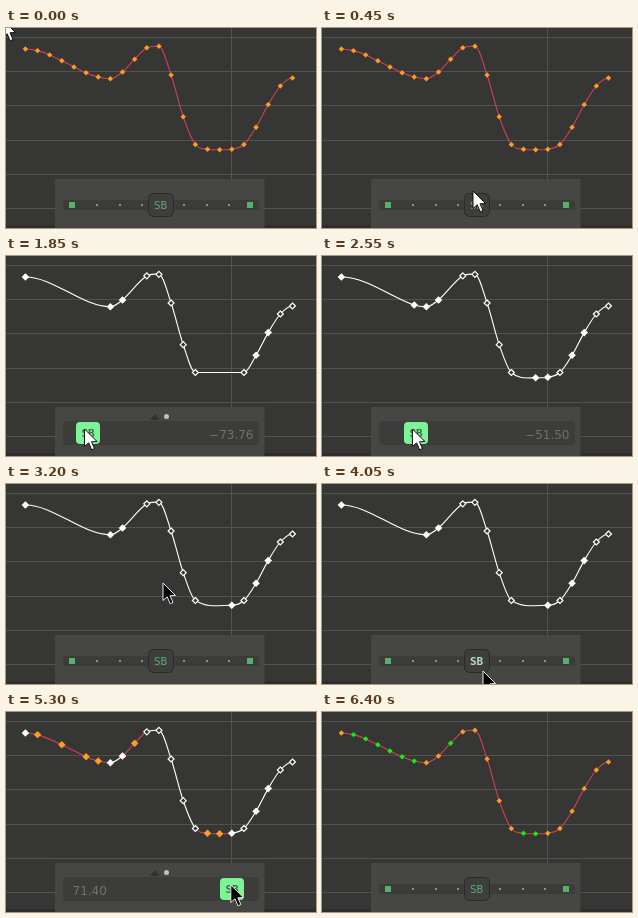
An HTML page with a canvas that plays this animation: 310 px wide and 200 px high, repeating every 6550 ms.

```html
<!DOCTYPE html>
<html lang="en">
<head>
<meta charset="utf-8">
<title>Curve simplify and bake slider</title>
<style>
html, body { margin: 0; width: 100%; height: 100%; overflow: hidden; background: #363635; }
canvas { display: block; width: 310px; height: 200px; }
</style>
</head>
<body>
<canvas id="stage" width="310" height="200"></canvas>
<script>
const LOOP = 6550, STEP = 50, MID = 154.5;
const ctx = document.getElementById('stage').getContext('2d');

const BG = '#363635', PANEL = '#464645', TRACK = '#3c3c3b';
const RED = '#cb4257', ORANGE = '#ff9c22', LIME = '#10f010', WHITE = '#fff', GREEN = '#52b268';

// Heights of the keys that shape the curve; the others are baked onto it
const shape = { 0: 21, 7: 50.7, 8: 44, 10: 19.8, 11: 18.3, 12: 47, 13: 88.7,
  14: 116.5, 17: 121.2, 18: 116.5, 19: 99.2, 20: 76.6, 21: 58, 22: 50 };

// Keys vanish and return one by one at even steps of the slider value
const dropOrder = [2, 4, 3, 1, 15, 9, 5, 6, 16, 17];
const bakeOrder = [3, 15, 9, 1, 5, 16, 6, 2, 4];
const passed = (order, i, first, gap, v) => order.includes(i) && v >= first + gap * order.indexOf(i);
const dropped = (k, v) => passed(dropOrder, k.i, 3, 7.5, v);
const baked = (k, v) => passed(bakeOrder, k.i, 20, 8.5, v);
const isSolid = i => i < 9 || (i > 15 && i < 21 && i !== 18);

// Flat at ends and extremes, otherwise aimed along the neighbours
function slopes(p) {
  const rise = (a, b) => (b.y - a.y) / (b.x - a.x);
  return p.map((k, i) => {
    if (!i || i === p.length - 1) return 0;
    const a = rise(p[i - 1], k), b = rise(k, p[i + 1]);
    if (a * b <= 0) return 0;
    const m = Math.abs(rise(p[i - 1], p[i + 1]));
    return Math.sign(a) * Math.min(m, 5 * Math.abs(a), 5 * Math.abs(b));
  });
}

function heightAt(p, x) {
  const m = slopes(p), j = p.findIndex(k => k.x >= x), a = p[j - 1], b = p[j];
  const w = b.x - a.x, u = (x - a.x) / w, s = u * u * (3 - 2 * u);
  return a.y + (b.y - a.y) * s + w * u * (1 - u) * (m[j - 1] * (1 - u) - m[j] * u);
}

const keyX = i => 19.4 + 12.14 * i;
const main = Object.keys(shape).map(i => ({ x: keyX(+i), y: shape[i] }));
const keys = Array.from({ length: 23 }, (_, i) =>
  ({ i, x: keyX(i), y: shape[i] ?? heightAt(main, keyX(i)) }));

// Pointer runs: [time, x, y]; it is hidden between runs
const runs = [
  [[0, -3, -8], [450, 151, 163], [600, 151, 163], [850, 151, 177], [1200, 135.12, 176],
   [1850, 78.5, 173], [2100, 76.5, 173], [2350, 92.4, 173], [2500, 92.4, 173],
   [2750, 82.5, 173], [3000, 83, 177]],
  [[3200, 157, 99], [3400, 141, 124], [3700, 141, 124]],
  [[3900, 150, 172], [4050, 161, 187], [4300, 153.5, 177], [4700, 193.22, 173],
   [5550, 238, 173], [5800, 238, 178]]
];

function pointer(t) {
  const run = runs.find(r => t >= r[0][0] && t <= r[r.length - 1][0]);
  if (!run) return null;
  const i = Math.max(1, run.findIndex(stop => stop[0] >= t));
  const [t0, x0, y0] = run[i - 1], [t1, x1, y1] = run[i];
  const k = (t - t0) / (t1 - t0);
  return { x: x0 + (x1 - x0) * k, y: y0 + (y1 - y0) * k };
}

const handleX = t => pointer(t).x + (t < 3000 ? 3.5 : 1);

function valueAt(t) {
  const d = handleX(t) - MID;
  return Math.max(-100, Math.min(100, d * Math.abs(d) * 0.014033));
}

function box(x, y, w, h, r, fill, stroke) {
  ctx.beginPath();
  ctx.roundRect(x, y, w, h, r);
  ctx.fillStyle = fill;
  ctx.fill();
  if (stroke) outline(stroke, 1);
}

function outline(color, width) {
  ctx.strokeStyle = color;
  ctx.lineWidth = width;
  ctx.stroke();
}

function polygon(points, x, y, fill) {
  ctx.beginPath();
  for (const [dx, dy] of points) ctx.lineTo(x + dx, y + dy);
  ctx.closePath();
  ctx.fillStyle = fill;
  ctx.fill();
}

function label(text, x, y, color, font, align) {
  ctx.font = font;
  ctx.textAlign = align;
  ctx.fillStyle = color;
  ctx.fillText(text, x, y);
}

function badge(x, color, weight) {
  label('SB', x, 181, color, `${weight} 11px "DejaVu Sans Mono", monospace`, 'center');
}

function grid() {
  ctx.fillStyle = BG;
  ctx.fillRect(0, 0, 310, 200);
  ctx.fillStyle = '#525251';
  for (let i = 0; i < 6; i++) ctx.fillRect(0, Math.round(9 + 34.2 * i), 310, 1);
  ctx.fillRect(225, 0, 1, 200);
  ctx.fillStyle = '#2f2c2d';
  ctx.fillRect(0, 197, 310, 3);
}

function curve(p, isRed) {
  const m = slopes(p);
  for (let i = 0; i < p.length - 1; i++) {
    const a = p[i], b = p[i + 1], h = (b.x - a.x) / 3;
    ctx.beginPath();
    ctx.moveTo(a.x, a.y);
    ctx.bezierCurveTo(a.x + h, a.y + m[i] * h, b.x - h, b.y - m[i + 1] * h, b.x, b.y);
    outline(isRed(a) || isRed(b) ? RED : WHITE, 1.1);
  }
}

function diamond({ x, y }, r, fill, stroke) {
  polygon([[0, -r], [r, 0], [0, r], [-r, 0]], x, y, fill);
  if (stroke) outline(stroke, 1.2);
}

function graph(t) {
  const selected = t < 850 || t >= 5700;
  const dropV = selected ? 0 : -valueAt(Math.min(t, 2750));
  const bakeV = t >= 4300 && t < 5700 ? valueAt(t) : 0;
  const shown = keys.filter(k => !dropped(k, dropV) || baked(k, bakeV));

  curve(shown, k => selected || baked(k, bakeV));
  for (const k of shown) {
    if (selected) diamond(k, 2.7, t >= 6400 && bakeOrder.includes(k.i) ? LIME : ORANGE);
    else if (baked(k, bakeV)) diamond(k, 3.7, ORANGE);
    else if (t < 1350) diamond(k, 2, BG, WHITE);
    else if (isSolid(k.i)) diamond(k, 3.8, WHITE);
    else diamond(k, 3, BG, WHITE);
  }
}

function idleSlider(hover) {
  box(57, 172, 196, 10, 2, TRACK);
  ctx.fillStyle = GREEN;
  for (const side of [-1, 1]) {
    ctx.fillRect(155 + side * 89 - 3, 174, 6, 6);
    for (let i = 0; i < 3; i++) ctx.fillRect(Math.round(157 + side * (21 + 22.5 * i)) - 0.5 - 0.5, 176, 2, 2);
  }
  box(142.5, 165.5, 25, 23, 5, '#3e3e3d', '#2a2a29');
  badge(MID, hover ? '#b4dfbf' : GREEN, hover ? 'bold' : 'normal');
}

function activeSlider(t) {
  const v = valueAt(t), x = Math.round(handleX(t) + 0.3);
  box(57, 165, 196, 24, 4, TRACK);
  if (t < 2100 || t > 3000) {
    polygon([[-5, 6], [0, 0], [5, 6]], 149, 158, '#333332');
    box(158, 158, 5, 5, 2.5, '#c4c1bc');
  }
  const text = (v < 0 ? '\u2212' : '') + Math.abs(v).toFixed(2);
  label(text, v < 0 ? 247.5 : 66.5, 183, '#70706f', '12px "DejaVu Sans", sans-serif', v < 0 ? 'right' : 'left');
  box(x - 12, 166, 24, 22, 4, '#7df496');
  badge(x, '#3b7049', 'bold');
}

const ARROW = [[0, 0], [0, 17.5], [4.2, 13.8], [7.2, 20.8], [10, 19.5], [7, 12.8], [12.5, 12.5]];

function draw(t) {
  const p = pointer(t);
  const pressed = (t >= 850 && t < 2950) || (t >= 4300 && t < 5700);
  grid();
  graph(t);
  box(49, 151, 209.5, 49, 0, PANEL);
  if (pressed) activeSlider(t);
  else idleSlider(p && p.y > 165 && Math.abs(p.x - MID) < 13);
  if (p) {
    const light = t < 3100;
    polygon(ARROW, p.x, p.y, light ? WHITE : '#000');
    outline(light ? '#111' : '#e8e8e8', 1);
  }
}

const start = performance.now();
function tick() {
  const t = (performance.now() - start) % LOOP;
  draw(Math.floor(t / STEP) * STEP);
  requestAnimationFrame(tick);
}
tick();
</script>
</body>
</html>
```
